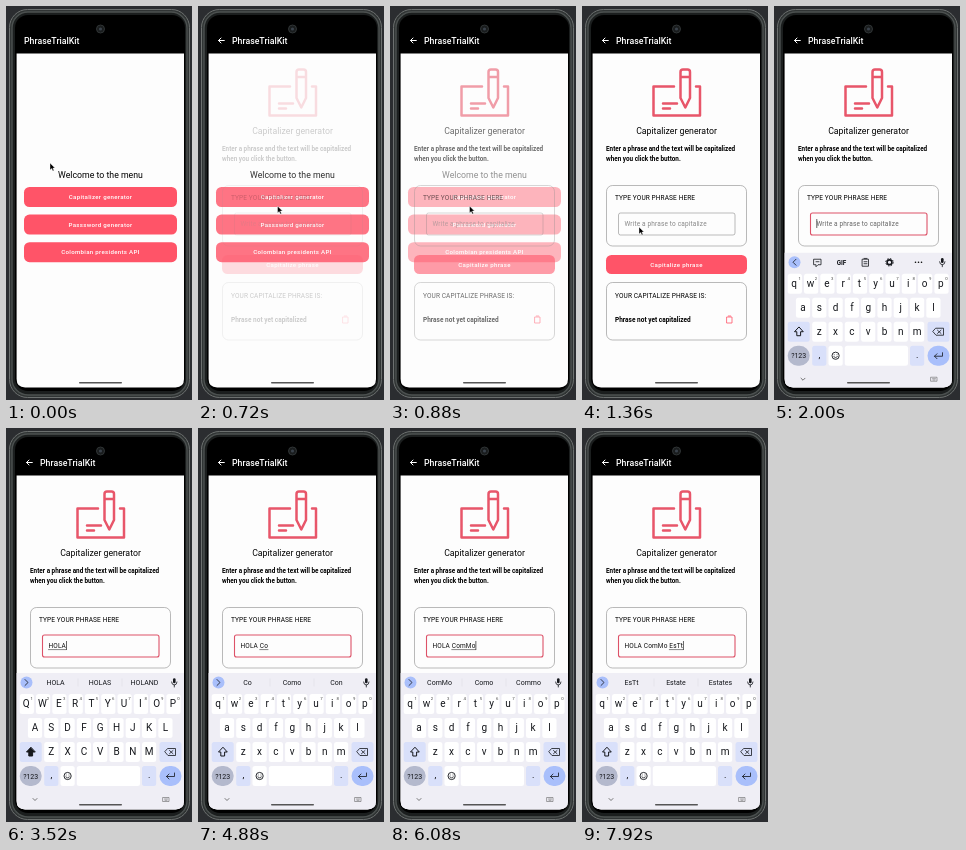
An HTML page that plays this animation: 186 px wide and 394 px high, repeating every 8000 ms.

```html
<!DOCTYPE html>
<html lang="en">
<head>
<meta charset="utf-8">
<style>
  html, body { margin: 0; width: 100%; height: 100%; overflow: hidden; background: #2b2d30; }
  svg { display: block; width: 100vw; height: 100vh; }
  text { font-family: Roboto, sans-serif; white-space: pre; }
  .mid { text-anchor: middle; }
  .line { fill: none; stroke-linecap: round; stroke-linejoin: round; }
</style>
</head>
<body>
<svg id="stage" viewBox="0 0 186 394"></svg>
<script>
const LOOP = 8000, RED = '#ff5468', INK = '#15171c';
const stage = document.getElementById('stage');
const $ = id => document.getElementById(id);

// Markup helpers
const rect = (x, y, w, h, r, fill, more = '') =>
  `<rect x="${x}" y="${y}" width="${w}" height="${h}" rx="${r}" fill="${fill}" ${more}/>`;
const text = (x, y, size, s, more = '') =>
  `<text x="${x}" y="${y}" font-size="${size}" ${more}>${s}</text>`;
const line = (d, color = INK, width = .8, more = '') =>
  `<path class="line" d="${d}" stroke="${color}" stroke-width="${width}" ${more}/>`;
const button = (x, y, w, h, label) => rect(x, y, w, h, 5.5, RED) +
  text(94.5, y + h / 2 + 2.2, 6.13, label, 'class="mid" fill="#fff" font-weight="500" letter-spacing=".3"');
const card = (y, h) => rect(24.5, y, 140, h, 6, 'none', 'stroke="#8c8c8c" stroke-width=".6"');

const phone = rect(3.5, 3.5, 180, 388, 18, '#303434', 'stroke="#6c706f"') +
  rect(6, 6, 175, 383, 16, '#1b1e1e', 'stroke="#4c5150" stroke-width="1.4"') +
  rect(9, 9, 170, 376, 13, '#000');

const menu = text(94.5, 172, 8.75, 'Welcome to the menu', 'class="mid"') +
  ['Capitalizer generator', 'Passsword generator', 'Colombian presidents API']
    .map((label, i) => button(18, 181 + 27.6 * i, 153, 20, label)).join('');

const icon = line('M92 80.5H71.5V109.5H118V80.5H114M81 97.5H95M81 102.5H88' +
  'M98.5 92V66Q98.5 63.5 101 63.5H105.5Q108 63.5 108 66V92L103.3 101.5ZM98.5 71H108', '#e8566a', 2.5);

const form = icon +
  text(94.5, 127.5, 8.75, 'Capitalizer generator', 'class="mid"') +
  text(24, 144.5, 6.36, 'Enter a phrase and the text will be capitalized', 'font-weight="600"') +
  text(24, 154.8, 6.36, 'when you click the button.', 'font-weight="600"') +
  card(179.5, 60.5) +
  text(33, 194, 6.56, 'TYPE YOUR PHRASE HERE', 'letter-spacing=".1"') +
  rect(36.5, 207, 116.5, 22, 2, 'none', 'id="field"') +
  `<text id="entry" x="42.5" y="220" font-size="6.5" letter-spacing=".15"></text>` +
  line('', '#333', .6, 'id="underline"') +
  rect(42, 213, .7, 9, 0, '#222', 'id="caret"') +
  button(24, 249, 141, 19, 'Capitalize phrase') +
  card(276.5, 57.5) +
  text(33, 291.5, 6.56, 'YOUR CAPITALIZE PHRASE IS:', 'letter-spacing=".1"') +
  text(33, 316, 6.5, 'Phrase not yet capitalized', 'font-weight="600"') +
  line('M145 311H150V317H145ZM146.3 310H148.7', RED, .8);

// Keyboard
const PITCH = 16.3, ACCENT = '#a9bffb', SOFT = '#d9e0fa';
const key = (cx, y, w = 14.2, fill = '#fff', r = 2.5) => rect(cx - w / 2, y, w, 20, r, fill);
const letters = (row, x0, y, digits) => [...row].map((c, i) => {
  const cx = x0 + PITCH * i;
  return key(cx, y) +
    text(cx - (digits ? .6 : 0), y + 13.2, 10, c, `class="mid letter" fill="${INK}"`) +
    (digits ? text(cx + 4.9, y + 6, 4.3, (i + 1) % 10, 'class="mid" fill="#444"') : '');
}).join('');

const toolbar = line('M22 251.5L19 254.5L22 257.5') +
  line('M40 251.5H47V257H44L42 259V257H40ZM42 254H45') +
  text(67.5, 257, 6.3, 'GIF', `class="mid" font-weight="700" fill="${INK}"`) +
  line('M88.5 251.5H94.5V258.5H88.5ZM90 250.7H93M90 254H93M90 256H93') +
  `<circle cx="115.5" cy="254.5" r="2.4" fill="none" stroke="${INK}" stroke-width="1.6"/>` +
  `<circle cx="115.5" cy="254.5" r="3.7" fill="none" stroke="${INK}" stroke-width="1" stroke-dasharray="1.5 1.4"/>` +
  [141.5, 144.5, 147.5].map(x => `<circle cx="${x}" cy="254.5" r=".8"/>`).join('');

const suggestions = line('M19 251.5L22 254.5L19 257.5') +
  [49.5, 94, 138.5].map((x, i) => text(x, 257, 7, '', `id="word${i}" class="mid" fill="${INK}"`)).join('') +
  line('M72 251V258M116 251V258', '#d8d8e0', .5);

const keyboard = rect(10, 245, 169, 140, 0, '#efeef5') +
  `<circle cx="20.5" cy="254.5" r="6" fill="${ACCENT}"/>` +
  `<g id="toolbar">${toolbar}</g><g id="suggestions">${suggestions}</g>` +
  rect(167, 250.3, 2.6, 5, 1.3, INK) + line('M165.6 254Q165.8 257 168.3 257Q170.8 257 171 254M168.3 257V259') +
  letters('qwertyuiop', 20.8, 266, true) +
  letters('asdfghjkl', 29, 290) +
  letters('zxcvbnm', 45.3, 314) +
  key(24.7, 314, 22, SOFT) + key(164.5, 314, 22, SOFT) +
  line('M24.7 319.5L20.5 324H22.8V328H26.6V324H28.9Z', INK, 1, 'id="shift"') +
  line('M162 320.5H169.5V327.5H162L159 324ZM163.5 322.5L167 325.7M167 322.5L163.5 325.7') +
  key(24.7, 338, 22, '#b4b9cd', 10) + text(24.7, 350.5, 7, '?123', `class="mid" fill="${INK}"`) +
  key(45.3, 338, 14.2, SOFT) + text(45.3, 350, 9, ',', 'class="mid"') +
  key(61.6, 338) + `<circle cx="61.6" cy="348" r="3.6" fill="none" stroke="${INK}" stroke-width=".9"/>` +
  line('M60.2 347V347M63 347V347M59.8 349Q61.6 351 63.4 349') +
  key(102.4, 338, 63.2) +
  key(143.1, 338, 14.2, SOFT) + text(143.1, 350, 9, '.', 'class="mid"') +
  key(164.5, 338, 22, ACCENT, 10) + line('M168.5 345V348.5H160.5M163 346L160.5 348.5L163 351') +
  line('M27 370.5L29 372.5L31 370.5', '#555') +
  line('M157 369.5H163V373.5H157ZM158.5 371H161.5M159 372.3H161', '#666', .6);

stage.innerHTML = `
  <clipPath id="screen"><path d="M10.6 47.4H178V373Q178 381.4 169.5 381.4H19.1Q10.6 381.4 10.6 373Z"/></clipPath>
  ${phone}
  <circle cx="94.5" cy="23" r="4" fill="#191c1d" stroke="#303435"/><circle cx="94.5" cy="23" r="1.6" fill="#39414a"/>
  <g clip-path="url(#screen)">
    ${rect(10, 47, 169, 336, 0, '#fdfdfd')}
    <g id="menu">${menu}</g><g id="form">${form}</g><g id="keyboard">${keyboard}</g>
    ${rect(73, 376, 43, 1.5, .7, '#555')}
  </g>
  <g id="back">${line('M26.3 34.5H20.5M23 32L20.5 34.5L23 37', '#fff', 1)}</g>
  ${text(18, 37.7, 8.75, 'PhraseTrialKit', 'id="title" fill="#fff" font-weight="500"')}
  <path id="pointer" d="M0 0V7L1.7 5.5L2.8 8L4 7.5L2.9 5.1H5Z" fill="#000" stroke="#fff" stroke-width=".4"/>`;

// Typed phrase over time, with the words offered for it
const typing = [
  [0, ''],
  [2640, 'H', 'H', 'He', 'Hi'],
  [3040, 'HO', 'HO', 'HOW', 'HOME'],
  [3280, 'HOL', 'HOL', 'HOLA', 'HOLD'],
  [3520, 'HOLA', 'HOLA', 'HOLAS', 'HOLAND'],
  [3920, 'HOLA ', 'a', 'como', 'que'],
  [4300, 'HOLA C', 'C', 'Can', 'Con'],
  [4380, 'HOLA Co', 'Co', 'Como', 'Con'],
  [5040, 'HOLA Com', 'Com', 'Como', 'Come'],
  [5440, 'HOLA ComM', 'ComM', 'Comm', 'Common'],
  [5760, 'HOLA ComMo', 'ComMo', 'Como', 'Commo'],
  [6460, 'HOLA ComMo ', 'the', 'and', 'is'],
  [7200, 'HOLA ComMo E', 'E', 'Es', 'En'],
  [7440, 'HOLA ComMo Es', 'Es', 'Est', 'Esta'],
  [7600, 'HOLA ComMo EsT', 'EsT', 'Est', 'Esta'],
  [7840, 'HOLA ComMo EsTt', 'EsTt', 'Estate', 'Estates']
];
const upperSpans = [[2600, 3600], [4080, 4880], [5280, 5600], [6240, 6480], [6680, 7640]];
const FOCUS = 1700;

const clamp = v => Math.max(0, Math.min(1, v));
const progress = (t, a, b) => clamp((t - a) / (b - a));
const ease = p => p * p * (3 - 2 * p);
const mix = (a, b, p) => a + (b - a) * p;
const show = (id, on) => $(id).style.display = on ? '' : 'none';
const keyLetters = [...document.querySelectorAll('.letter')];
const lower = keyLetters.map(el => el.textContent);

function drawEntry(t) {
  const focused = t >= FOCUS;
  const [time, phrase, ...words] = typing.filter(step => step[0] <= t).pop();
  const entry = $('entry'), field = $('field');
  field.setAttribute('stroke', focused ? '#dd5268' : '#777');
  field.setAttribute('stroke-width', focused ? 1.1 : .5);
  entry.textContent = phrase || 'Write a phrase to capitalize';
  entry.setAttribute('fill', phrase ? '#111' : focused ? '#666' : '#888');

  const widthTo = n => n ? entry.getSubStringLength(0, n) : 0;
  const end = 42.5 + widthTo(phrase.length);
  const wordStart = 42.5 + widthTo(phrase.lastIndexOf(' ') + 1);
  $('underline').setAttribute('d', end > wordStart ? `M${wordStart} 221.6H${end}` : '');
  $('caret').setAttribute('x', end);
  show('caret', focused && (t - Math.max(time, FOCUS)) % 1000 < 500);

  show('toolbar', !words.length);
  show('suggestions', words.length);
  words.forEach((word, i) => $('word' + i).textContent = word);
}

function draw(t) {
  const fade = progress(t, 640, 1060);
  $('menu').setAttribute('opacity', 1 - fade);
  $('form').setAttribute('opacity', fade);
  show('back', t >= 680);
  $('title').setAttribute('x', t >= 680 ? 34 : 18);

  const toButton = ease(progress(t, 40, 400)), toField = ease(progress(t, 960, 1360));
  const x = mix(mix(44, 79.5, toButton), 57, toField);
  const y = mix(mix(157, 200, toButton), 221, toField);
  $('pointer').setAttribute('transform', `translate(${x} ${y})`);
  show('pointer', t < 1500);

  const rise = 1 - (1 - progress(t, 1740, 2080)) ** 3;
  $('keyboard').setAttribute('transform', `translate(0 ${138 * (1 - rise)})`);
  const upper = upperSpans.some(([a, b]) => t >= a && t < b);
  keyLetters.forEach((el, i) => el.textContent = upper ? lower[i].toUpperCase() : lower[i]);
  $('shift').style.fill = upper ? INK : 'none';
  drawEntry(t);
}

const start = performance.now();
function tick() {
  draw((performance.now() - start) % LOOP);
  requestAnimationFrame(tick);
}
tick();
</script>
</body>
</html>
```
